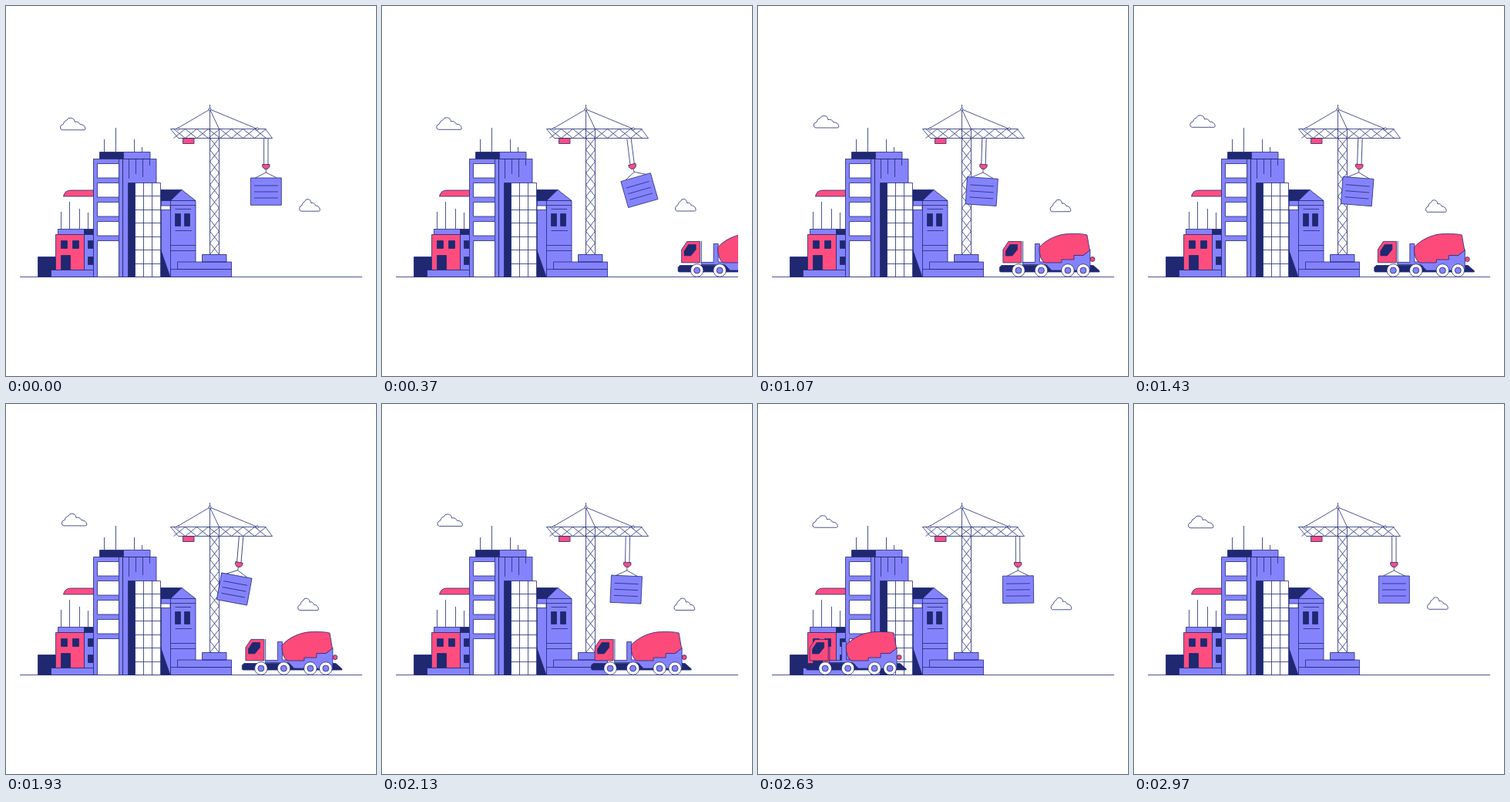
Recreate the animation shown at these times as an HTML page. Size 480 by 480 pixels, loop 3030 ms.

```html
<!DOCTYPE html>
<html lang="en">
<head>
<meta charset="utf-8">
<title>Construction site</title>
<style>
  html, body { margin: 0; width: 100%; height: 100%; overflow: hidden; background: #fff; }
  svg { display: block; width: 100vw; height: 100vh; }
  svg * { vector-effect: non-scaling-stroke; }
  .ink { stroke: #202a78; stroke-width: .8; stroke-linejoin: round; }
  .line { fill: none; }
  .violet { fill: #8583fc; }
  .pink { fill: #ff4d80; }
  #truck .pink { fill: #fc4a7a; }
  .navy { fill: #1f2870; }
  .white { fill: #fff; }
</style>
</head>
<body>
<svg viewBox="0 0 480 480" class="ink">
  <defs>
    <clipPath id="stage"><rect x="18" y="120" width="444" height="240"/></clipPath>
    <path id="cloud" d="M3 16Q0 15.500 .5 12Q1 9.300 4 8.800Q5 4.400 9 3.300Q10 0 14 .5Q19 1 19 5.500Q24 4.400 26 8.800Q32 8.800 33 14.300Q33 16 31 16Z"/>
    <g id="wheel">
      <circle r="8.3" class="white"/>
      <circle r="4" class="violet"/>
    </g>
  </defs>

  <g id="cloudA"><use href="#cloud" class="white"/></g>
  <g id="cloudB"><use href="#cloud" class="white" transform="scale(.82 1)"/></g>

  <path class="line" d="M18 351.5H462"/>

  <!-- small pink house -->
  <path class="navy" d="M41.5 325.5H64.5V351.5H41.5Z"/>
  <path class="line" d="M71.5 267V289M82.5 254V289M95.5 263V289M106.5 268V289"/>
  <path class="violet" d="M67.5 289.5H101.5V296.5H67.5ZM101.5 296.5H113.5V342.5H101.5Z"/>
  <path class="navy" d="M101.5 289.5H113.5V296.5H101.5ZM106.5 304.5H113.5V314.5H106.5ZM106.5 325.5H113.5V335.5H106.5Z"/>
  <path class="pink" d="M64.5 296.5H101.5V342.5H64.5ZM74.5 247Q76 239 84 239H113.5V247Z"/>
  <path class="navy" d="M71.5 304.5H79.5V314.5H71.5ZM86.5 304.5H94.5V314.5H86.5ZM71.5 323.5H83.5V342.5H71.5Z"/>
  <path class="violet" d="M58.5 342.5H113.5V351.5H58.5Z"/>

  <!-- gabled house -->
  <path class="violet" d="M201.5 252.5H246V351.5H201.5Z"/>
  <path class="navy" d="M200.5 238.5H228L214 252.5H200.5ZM201 317L213 351.5H201Z"/>
  <path class="violet" d="M213.5 252.5L228 238.5L246 252.5Z"/>
  <path class="white" d="M201 259H213V264.5H201Z"/>
  <path class="line" d="M213.5 252V351M213.5 258.5H246M219.5 263.5H240M219.5 291.5H241M213.5 310.5H246M213.5 317.5H246"/>
  <path class="navy" d="M219.5 269.5H226.5V285.5H219.5ZM231.5 269.5H238.5V285.5H231.5Z"/>

  <!-- towers -->
  <path class="line" d="M127.5 173V189M142.5 158V189M166.5 173V189M176.5 183V189"/>
  <path class="navy" d="M121.5 189.5H152.5V198.5H121.5Z"/>
  <path class="violet" d="M152.5 189.5H187V198.5H152.5ZM151.5 198.5H195V351.5H151.5ZM113.5 198.5H151.5V351.5H113.5Z"/>
  <path class="line" d="M146.5 198V351M159.5 198V224M168.5 198V218M177.5 198V222M186.5 198V207"/>
  <g id="panes" class="white"></g>
  <path class="navy" d="M158.5 229.5H167.5V351.5H158.5Z"/>
  <path class="white" d="M167.5 229.5H200.5V351.5H167.5Z"/>
  <path id="grid" class="line"/>

  <!-- crane -->
  <path class="violet" d="M254.5 322.5H286V332H254.5ZM222.5 332H292.5V341.5H222.5ZM213.5 341.5H292.5V351.5H213.5Z"/>
  <path class="pink" d="M229.5 171.5H244V178.5H229.5Z"/>
  <path id="lattice" class="line"/>
  <path class="line" d="M213.5 159.5H336.5L345.5 171.5H223.5ZM264.5 128V322M276.5 159V322M264.5 134L221 159.5M264.5 134L326 159.5M264.5 134L276.5 159.5"/>
  <g class="white">
    <circle cx="264.5" cy="134" r="1.5"/>
    <circle cx="223" cy="159.5" r="1.5"/>
    <circle cx="326" cy="159.5" r="1.5"/>
  </g>

  <g id="rope">
    <path class="line" d="M-2.7 0V34M2.7 0V34"/>
    <g id="load">
      <path class="line" d="M0 4V8M-14 15L0 8L14 15"/>
      <path class="pink" d="M-4.7 -2.5H4.7V.5L2 3.5H-2L-4.7 .5Z"/>
      <path class="violet" d="M-20 15H20V50.3H-20Z"/>
      <path class="line" d="M-15.5 25H15.5M-15.5 33H15.5M-15.5 41H15.5"/>
    </g>
  </g>

  <g clip-path="url(#stage)">
    <g id="truck">
      <path class="navy" d="M319.5 344V339L322 336.5H441L449 343.5V345H320.5Z"/>
      <g id="body">
        <circle class="pink" cx="440" cy="328.5" r="3"/>
        <path class="violet" d="M365.5 308.5H371.5V332H399V328H415V323H429L437 316V343H387L380 335.5H349.5V332.5H365.5Z"/>
        <path class="pink" d="M371 313C380 303 395 295.5 411 295.5Q426 295 433 297L436.5 317L428 323.5H416V329H400V333H378Q371 329 371 313Z"/>
        <path class="pink" d="M324 333V316L331 305.5H348V333Z"/>
        <path class="navy" d="M327.5 324V318L333 309.5H342.5V316L336 324Z"/>
        <path class="line" d="M349.8 305V333"/>
      </g>
      <use href="#wheel" x="344" y="343"/>
      <use href="#wheel" x="373.5" y="343"/>
      <use href="#wheel" x="408" y="343"/>
      <use href="#wheel" x="428" y="343"/>
    </g>
  </g>
</svg>
<script>
  const LOOP = 3030;
  const el = id => document.getElementById(id);
  const range = (n, f) => Array.from({ length: n }, (_, i) => f(i)).join('');
  const cross = (x, y, w, h) => `M${x} ${y}l${w} ${h}M${x + w} ${y}l${-w} ${h}`;

  el('panes').innerHTML = range(5, i => {
    const y = 204.5 + i * 25;
    return `<rect x="118.5" y="${y}" width="28" height="${i < 4 ? 18.5 : 351.5 - y}"/>`;
  });
  el('grid').setAttribute('d', 'M178.5 229V351M189.5 229V351' +
    range(6, i => `M167 ${Math.round(229 + 17.43 * (i + 1)) + .5}H201`));
  el('lattice').setAttribute('d',
    range(8, i => cross(217.5 + i * 15, 159.5, 15, 12)) +
    range(10, i => cross(264.5, 171.5 + i * 15.1, 12, 15.1)));

  // Smooth curve through [time, value] pairs, level at both ends.
  function curve(keys) {
    const slope = i => i < 1 || i > keys.length - 2 ? 0 :
      (keys[i + 1][1] - keys[i - 1][1]) / (keys[i + 1][0] - keys[i - 1][0]);
    return t => {
      let i = 0;
      while (i < keys.length - 2 && t > keys[i + 1][0]) i++;
      const [t0, a] = keys[i], [t1, b] = keys[i + 1];
      const d = t1 - t0, u = (t - t0) / d, v = 1 - u;
      return a * (1 + 2 * u) * v * v + b * u * u * (3 - 2 * u) +
        d * u * v * (v * slope(i) - u * slope(i + 1));
    };
  }

  const trolley = curve([[0, 337.3], [370, 320.5], [770, 297.5], [1100, 293.3],
    [1430, 293.5], [1930, 305], [2330, 332.5], [2700, 337.3], [LOOP, 337.3]]);
  const swing = curve([[0, 0], [370, -16], [770, 7], [1100, 3.5],
    [1430, 4.5], [1930, 10.5], [2330, -5.5], [2700, .5], [2970, 0], [LOOP, 0]]);
  const tilt = curve([[0, 0], [400, 0], [770, -1.2], [1100, 0], [LOOP, 0]]);

  function drive(t) {
    const arrive = 500 * Math.exp(-.0052 * t);
    const leave = 530 * Math.max(0, (t - 1830) / 1200) ** 1.87;
    return arrive - 8 - leave;
  }

  const place = (id, x, y, angle = 0) =>
    el(id).setAttribute('transform', `translate(${x} ${y}) rotate(${angle})`);

  function draw(now) {
    const t = now % LOOP;
    const drift = phase => (1 - Math.cos((t - phase) / LOOP * 2 * Math.PI)) / 2;
    const angle = swing(t);
    place('cloudA', 70 + 2.3 * drift(0), 144.8 - 3.5 * drift(0));
    place('cloudB', 380.3 - 2.2 * drift(100), 250 + 1.6 * drift(350));
    place('rope', trolley(t), 172, angle * .45);
    place('load', 0, 36, angle * .55);
    place('truck', drive(t), 0);
    el('body').setAttribute('transform', `rotate(${tilt(t)} 386 340)`);
  }

  const start = performance.now();
  function tick() {
    draw(performance.now() - start);
    requestAnimationFrame(tick);
  }
  tick();
</script>
</body>
</html>
```
